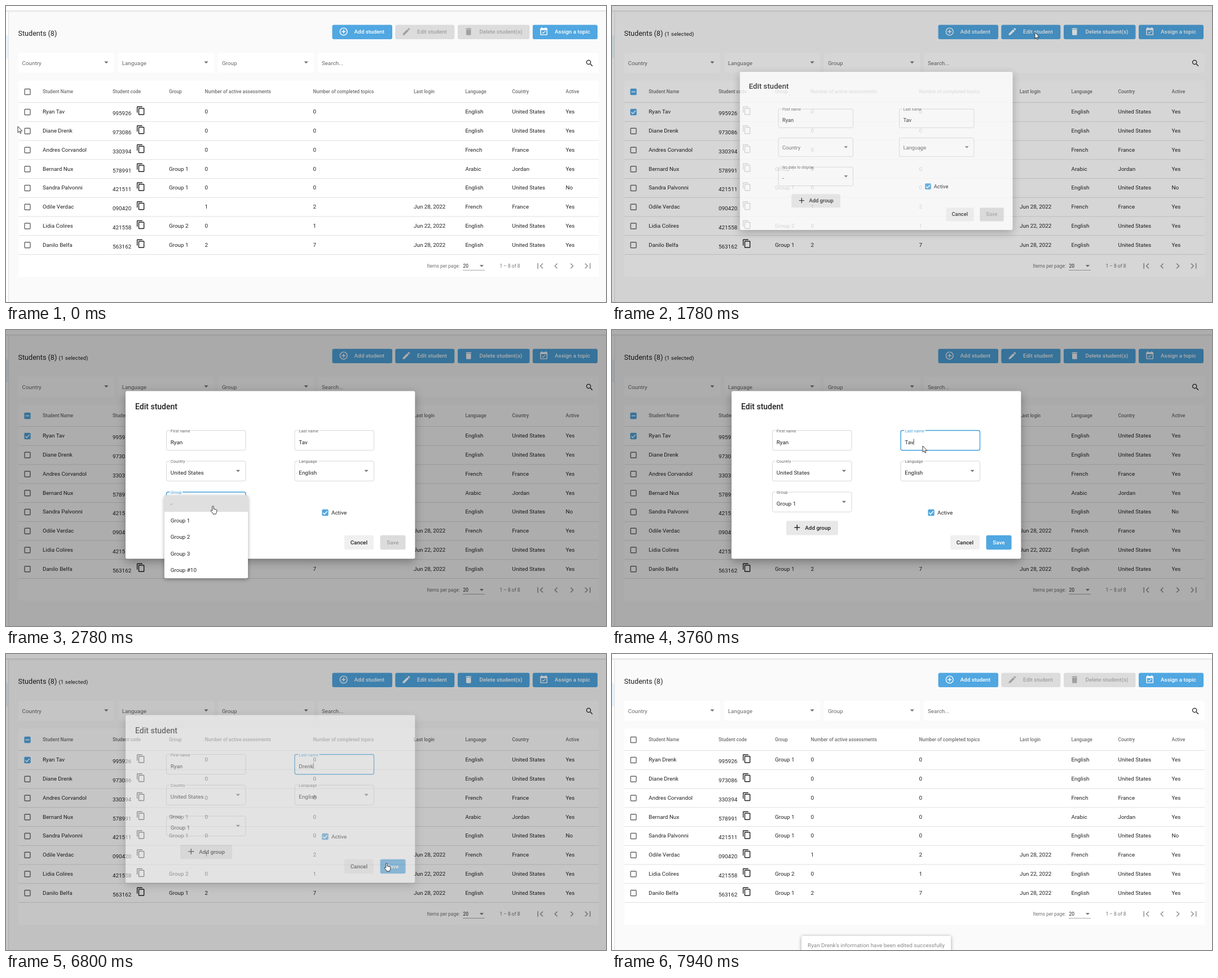
An HTML page that plays this animation: 1064 px wide and 526 px high, repeating every 8 s.

```html
<!DOCTYPE html>
<html lang="en">
<head>
<meta charset="utf-8">
<title>Students</title>
<style>
html, body { margin: 0; width: 100%; height: 100%; overflow: hidden; background: #fafafa; }
svg { display: block; width: 100vw; height: 100vh; font: 9.87px Roboto, sans-serif; }
text { fill: rgba(0,0,0,.87); white-space: pre; }
.title { font-size: 12.6px; }
.head { font-size: 8.46px; font-weight: 500; fill: rgba(0,0,0,.56); }
.small { font-size: 8.46px; fill: rgba(0,0,0,.56); }
.dark { font-size: 8.46px; }
.muted { fill: rgba(0,0,0,.6); }
.strong { font-weight: 500; }
.heading { font-size: 14px; font-weight: 500; }
.white { fill: #fff; }
.label { font-size: 7.4px; fill: rgba(0,0,0,.6); stroke: #fff; stroke-width: 4; paint-order: stroke; }
.card { fill: #fff; }
.line { stroke: rgba(0,0,0,.13); stroke-width: 1; }
.button rect { fill: #50a7e1; }
.button text, .button path { fill: #fff; }
.button.off rect { fill: #dcdcdc; }
.button.off text, .button.off path { fill: rgba(0,0,0,.27); }
.button.plain rect { fill: #e8e8e8; }
.button.pale rect { fill: #f0f0f0; }
.button.plain text, .button.plain path, .button.pale text { fill: rgba(0,0,0,.87); }
.box rect { fill: none; stroke: rgba(0,0,0,.6); stroke-width: 1.4; }
.box path { fill: none; stroke: #fff; stroke-width: 1.5; visibility: hidden; }
.box.on rect { fill: #50a7e1; stroke: #50a7e1; }
.box.on path { visibility: visible; }
.field rect { fill: none; stroke: rgba(0,0,0,.2); stroke-width: .8; }
.field.focus rect { stroke: #429fdb; stroke-width: 1.4; }
.field.focus .label { fill: #429fdb; }
.arrow { fill: rgba(0,0,0,.56); }
.icon { fill: rgba(0,0,0,.87); }
.pager { fill: rgba(0,0,0,.4); }
#modal > .sheet { fill: #fff; filter: drop-shadow(0 5px 8px rgba(0,0,0,.3)); }
#panel > .sheet { fill: #fff; filter: drop-shadow(0 2px 3px rgba(0,0,0,.35)); }
#toast rect { fill: #fff; filter: drop-shadow(0 1px 3px rgba(0,0,0,.35)); }
#toast text { fill: rgba(0,0,0,.47); text-anchor: middle; }
#cursor path { fill: #fff; stroke: #222; stroke-width: .9; stroke-linejoin: round; }
</style>
</head>
<body>
<svg id="stage" viewBox="0 0 1064 526" preserveAspectRatio="none"></svg>
<script>
const LOOP = 8000;
const FIRST = 'Ryan', OLD_LAST = 'Tav', NEW_LAST = 'Drenk';

const icons = {
  add: 'M13 7h-2v4H7v2h4v4h2v-4h4v-2h-4V7zm-1-5C6.48 2 2 6.48 2 12s4.48 10 10 10 10-4.48 10-10S17.52 2 12 2zm0 18c-4.41 0-8-3.59-8-8s3.59-8 8-8 8 3.59 8 8-3.59 8-8 8z',
  edit: 'M3 17.25V21h3.75L17.81 9.94l-3.75-3.75L3 17.25zM20.71 7.04c.39-.39.39-1.02 0-1.41l-2.34-2.34c-.39-.39-1.02-.39-1.41 0l-1.83 1.83 3.75 3.75 1.83-1.83z',
  bin: 'M6 19c0 1.1.9 2 2 2h8c1.1 0 2-.9 2-2V7H6v12zM19 4h-3.5l-1-1h-5l-1 1H5v2h14V4z',
  event: 'M16.53 11.06L15.47 10l-4.88 4.88-2.12-2.12-1.06 1.06L10.59 17l5.94-5.94zM19 3h-1V1h-2v2H8V1H6v2H5c-1.11 0-2 .9-2 2v14c0 1.1.89 2 2 2h14c1.1 0 2-.9 2-2V5c0-1.1-.9-2-2-2zm0 16H5V8h14v11z',
  plus: 'M19 13h-6v6h-2v-6H5v-2h6V5h2v6h6z',
  search: 'M15.5 14h-.79l-.28-.27A6.5 6.5 0 1 0 13.73 14.43l.27.28v.79l5 5L20.5 19zm-6 0a4.5 4.5 0 1 1 0-9 4.5 4.5 0 0 1 0 9z',
  copy: 'M16 1H4c-1.1 0-2 .9-2 2v14h2V3h12V1zm3 4H8c-1.1 0-2 .9-2 2v14c0 1.1.9 2 2 2h11c1.1 0 2-.9 2-2V7c0-1.1-.9-2-2-2zm0 16H8V7h11v14z',
  first: 'M18.41 16.59L13.82 12l4.59-4.59L17 6l-6 6 6 6zM6 6h2v12H6z',
  prev: 'M15.41 7.41L14 6l-6 6 6 6 1.41-1.41L10.83 12z',
  next: 'M10 6L8.59 7.41 13.17 12l-4.58 4.59L10 18l6-6z',
  last: 'M5.59 7.41L10.18 12l-4.59 4.59L7 18l6-6-6-6zM16 6h2v12h-2z'
};

const text = (x, y, s, cls = '', id = '') => `<text x="${x}" y="${y}" class="${cls}" id="${id}">${s}</text>`;
const rect = (x, y, w, h, cls = '', r = 3) => `<rect x="${x}" y="${y}" width="${w}" height="${h}" rx="${r}" class="${cls}"/>`;
const line = (x1, x2, y) => `<path class="line" d="M${x1} ${y}H${x2}"/>`;
const icon = (name, cx, cy, cls = 'icon', k = .705) =>
  `<path class="${cls}" d="${icons[name]}" transform="translate(${cx} ${cy}) scale(${k}) translate(-12 -12)"/>`;
const arrow = (cx, cy) => `<path class="arrow" d="M${cx - 3.6} ${cy - 1.8}h7.2l-3.6 3.6z"/>`;
const button = (id, cls, x, y, w, label, labelX, glyph = '', glyphX = 0) =>
  `<g id="${id}" class="button ${cls}">${rect(x, y, w, 25.5)}${glyph && icon(glyph, glyphX, y + 12)}${text(labelX, y + 15.8, label, 'strong')}</g>`;
const checkbox = (id, cx, cy, mark = 'M-3.7 .2l2.5 2.6 4.9-5.4', on = '') =>
  `<g id="${id}" class="box ${on}" transform="translate(${cx} ${cy})">${rect(-4.95, -4.95, 9.9, 9.9, '', 1)}<path d="${mark}"/></g>`;
const field = (id, x, y, label, value, select) =>
  `<g id="${id}" class="field">${rect(x, y, 140.5, 35.3)}${text(x + 7.3, y + 3.2, label, 'label')}` +
  `${text(x + 7.3, y + 24, value, 'value')}${select ? arrow(x + 127, y + 17.5) : ''}</g>`;

const columns = [65, 189, 289, 352.5, 544.5, 723, 814.5, 897.5, 992.5];
const headings = ['Student Name', 'Student code', 'Group', 'Number of active assessments',
  'Number of completed topics', 'Last login', 'Language', 'Country', 'Active'];
const rows = `${FIRST} ${OLD_LAST}|995926||0|0||English|United States|Yes
Diane Drenk|973086||0|0||English|United States|Yes
Andres Corvandol|330394||0|0||French|France|Yes
Bernard Nux|578991|Group 1|0|0||Arabic|Jordan|Yes
Sandra Palvonni|421511|Group 1|0|0||English|United States|No
Odile Verdac|090420||1|2|Jun 28, 2022|French|France|Yes
Lidia Colires|421558|Group 2|0|1|Jun 22, 2022|English|United States|Yes
Danilo Belfa|563162|Group 1|2|7|Jun 28, 2022|English|United States|Yes`
  .split('\n').map(row => row.split('|'));

function tableRow(cells, i) {
  const y = 191.3 + 33.75 * i;
  return cells.map((cell, c) => text(columns[c], c === 1 ? y + 3 : y, cell, '', `cell${i}-${c}`)).join('') +
    checkbox('check' + i, 38, y - 2.8) + icon('copy', 239, y - 5.3) + line(22, 1051, y + 14);
}

const page = `<rect width="1064" height="526" fill="#fafafa"/>
  ${rect(0, 10, 4, 516, 'card', 0)}<rect y="52" width="4" height="41" fill="#e9f4fc"/>
  <path d="M4.5 10V526" stroke="#dfdfdf"/>
  <rect y="8" width="1064" height="1.2" fill="#dcdcdc"/><rect y="9.2" width="1064" height="1.5" fill="#f0f0f0"/>
  ${rect(0, 0, 1064, 8, 'card', 0)}
  ${text(21.5, 53.4, 'Students (8)', 'title')}${text(93.5, 53, '(1 selected)', '', 'selected')}
  ${button('addStudent', '', 578.5, 33.5, 106.5, 'Add student', 617.5, 'add', 598.7)}
  ${button('editStudent', 'off', 690.3, 33.5, 105, 'Edit student', 729, 'edit', 710)}
  ${button('deleteStudent', 'off', 801, 33.5, 127.5, 'Delete student(s)', 839.5, 'bin', 820.3)}
  ${button('assign', '', 934, 33.5, 115, 'Assign a topic', 973, 'event', 953.7)}
  ${['Country', 'Language', 'Group'].map((name, i) => rect(21.7 + 177.2 * i, 83, 170, 35.5, 'card') +
    text(28.5 + 177.2 * i, 104.5, name, 'muted') + arrow(177.8 + 177.2 * i, 100.4)).join('')}
  ${rect(553, 83, 498, 35.5, 'card')}${text(560, 104.5, 'Search...', 'muted')}${icon('search', 1034.8, 101.6, 'icon', .66)}
  ${rect(21.7, 132.5, 1029.5, 349, 'card')}
  ${headings.map((h, i) => text(columns[i], 155, h, 'head')).join('')}
  ${checkbox('checkAll', 38, 152.5, 'M-3.5 0H3.5')}${line(22, 1051, 171.5)}
  ${rows.map(tableRow).join('')}
  <circle id="ripple" cx="38" cy="188.5" fill="#50a7e1"/>
  ${text(746.5, 465, 'Items per page:', 'small')}${text(810.5, 465, '20', 'dark')}
  ${arrow(843.5, 462)}<path d="M810 469.5h39" stroke="rgba(0,0,0,.42)" stroke-width=".8"/>
  ${text(875.5, 464.5, '1 – 8 of 8', 'small')}
  ${['first', 'prev', 'next', 'last'].map((name, i) => icon(name, 947.3 + 28.1 * i, 462, 'pager', .82)).join('')}`;

const modal = `<g id="modal">${rect(212, 108.5, 513.3, 298, 'sheet')}
  ${text(229, 140.5, 'Edit student', 'heading')}
  ${field('firstName', 284.5, 178.5, 'First name', FIRST)}
  ${field('lastName', 512, 178.5, 'Last name', OLD_LAST)}
  ${field('country', 284.5, 233, 'Country', '', true)}
  ${field('language', 512, 233, 'Language', '', true)}
  ${field('group', 284.5, 288, 'Group', '-', true)}
  <path id="caret" d="M0 193.5V204" stroke="#222" stroke-width=".8"/>
  ${checkbox('active', 566, 324.5, undefined, 'on')}${text(577, 328, 'Active')}
  ${button('addGroup', 'plain', 309, 339, 92, 'Add group', 342.3, 'plus', 328.3)}
  ${button('cancel', 'pale', 600, 364.7, 52, 'Cancel', 610.7)}
  ${button('save', 'off', 663.5, 364.7, 45, 'Save', 675.2)}</g>`;

const panel = `<g id="panel">${rect(280.8, 293.7, 148.3, 147.5, 'sheet')}
  <rect x="280.8" y="293.7" width="148.3" height="29.5" fill="#dfdfdf"/>
  <rect id="hover" x="280.8" y="323.2" width="148.3" height="29.6" fill="#f3f3f3"/>
  ${['-', 'Group 1', 'Group 2', 'Group 3', 'Group #10'].map((s, i) =>
    text(291.8, 312 + 29.55 * i, s, i ? '' : 'muted')).join('')}</g>`;

const $ = id => document.getElementById(id);
$('stage').innerHTML = page + '<rect id="shade" width="1064" height="526"/>' + modal + panel +
  `<g id="toast">${rect(336, 501, 265, 34)}${text(468.5, 521, `${FIRST} ${NEW_LAST}'s information have been edited successfully`)}</g>
  <g id="cursor"><path id="pointer" d="M0 0V11l2.5-2.3 1.7 3.8 1.7-.8-1.7-3.6h3.5z"/>
  <path id="hand" d="M-1.2 1a1.2 1.2 0 0 1 2.4 0v4l4.6 1.2q1.4.5 1.2 2l-.7 3.1q-.2 1-.9 1.8v1H.2v-1L-3.4 9q-.7-1.4.5-1.9 1-.3 1.7.9z"/></g>`;

function bezier(x1, y1, x2, y2) {
  const at = (a, b, s) => 3 * (1 - s) ** 2 * s * a + 3 * (1 - s) * s * s * b + s ** 3;
  return p => {
    let lo = 0, hi = 1;
    for (let i = 0; i < 20; i++) {
      const mid = (lo + hi) / 2;
      if (at(x1, x2, mid) < p) lo = mid; else hi = mid;
    }
    return at(y1, y2, hi);
  };
}
const decelerate = bezier(0, 0, .2, 1), swift = bezier(.25, .8, .25, 1), glide = bezier(.4, 0, .4, 1);
const linear = p => p;
const progress = (t, start, span, ease = linear) => ease(Math.min(1, Math.max(0, (t - start) / span)));
const within = (t, a, b) => t >= a && t < b;
const show = (id, visible) => $(id).style.display = visible ? '' : 'none';
const scaleAt = (cx, cy, kx, ky = kx) => `translate(${cx} ${cy}) scale(${kx} ${ky}) translate(${-cx} ${-cy})`;

// time, x, y
const path = [[320, 21, 214], [640, 37, 187], [900, 37, 187], [1500, 750, 47], [2000, 750, 47], [2200, 602, 180],
  [2450, 367, 313], [2790, 367, 313], [3000, 345, 338], [3150, 345, 338], [3570, 551, 206], [3780, 551, 206],
  [4080, 557, 212], [6150, 557, 212], [6560, 675, 372]];
const hands = [[560, 950], [1440, 1720], [2350, 3240], [6500, 7000]];
const typing = [[4750, 0], [5020, 1], [5290, 2], [5420, 3], [5620, 4], [5690, 5]];

function cursorAt(t) {
  const i = path.findIndex(p => p[0] > t);
  if (i === 0) return path[0].slice(1);
  if (i < 0) return path[path.length - 1].slice(1);
  const [t0, x0, y0] = path[i - 1], [t1, x1, y1] = path[i];
  const k = progress(t, t0, t1 - t0, glide);
  return [x0 + (x1 - x0) * k, y0 + (y1 - y0) * k];
}

function setField(id, label, value, placeholder = false) {
  const [labelText, valueText] = $(id).querySelectorAll('text');
  labelText.textContent = placeholder ? '' : label;
  valueText.textContent = placeholder ? label : value;
  valueText.classList.toggle('muted', placeholder);
  const top = +$(id).querySelector('rect').getAttribute('y');
  valueText.setAttribute('y', top + (placeholder ? 22 : 24));
}

function renderTable(t) {
  const picked = within(t, 700, 7060), saved = t >= 7060;
  show('selected', picked);
  for (const id of ['editStudent', 'deleteStudent']) $(id).classList.toggle('off', !picked);
  for (const id of ['checkAll', 'check0']) $(id).classList.toggle('on', picked);
  $('cell0-0').textContent = `${FIRST} ${saved ? NEW_LAST : OLD_LAST}`;
  $('cell0-2').textContent = saved ? 'Group 1' : '';
  $('ripple').setAttribute('r', 14 * progress(t, 680, 200, decelerate));
  $('ripple').setAttribute('opacity', .18 * (1 - progress(t, 850, 250)));
}

function renderModal(t) {
  const enter = progress(t, 1712, 150, decelerate), leave = progress(t, 6765, 75);
  show('modal', enter > 0 && leave < 1);
  $('modal').setAttribute('opacity', enter * (1 - leave));
  $('modal').setAttribute('transform', scaleAt(468.6, 257.5, .7 + .3 * enter));
  $('shade').setAttribute('opacity', .32 * (progress(t, 1718, 400, swift) - progress(t, 6765, 400, swift)));

  const loaded = t >= 1850, grouped = t >= 3080;
  setField('country', 'Country', 'United States', !loaded);
  setField('language', 'Language', 'English', !loaded);
  setField('group', loaded ? 'Group' : 'No data to display', grouped ? 'Group 1' : '-');
  $('save').classList.toggle('off', !grouped);
  $('group').classList.toggle('focus', within(t, 2450, 3690));
  $('lastName').classList.toggle('focus', t >= 3690);

  const typed = typing.filter(step => t >= step[0]).pop();
  setField('lastName', 'Last name', typed ? NEW_LAST.slice(0, typed[1]) : OLD_LAST);
  show('caret', t >= 3690 && !within(t, 4090, 4420));
  const width = $('lastName').querySelector('.value').getComputedTextLength();
  $('caret').setAttribute('transform', `translate(${519.7 + width} 0)`);

  const open = progress(t, 2450, 120, decelerate), close = progress(t, 3080, 100);
  show('panel', open > 0 && close < 1);
  $('panel').setAttribute('opacity', open * (1 - close));
  $('panel').setAttribute('transform', scaleAt(355, 294, 1, .8 + .2 * open));
  show('hover', t >= 2900);
}

function renderToast(t) {
  const k = progress(t, 6855, 150, decelerate);
  $('toast').setAttribute('opacity', k);
  $('toast').setAttribute('transform', scaleAt(468.5, 518, .8 + .2 * k));
}

function renderCursor(t) {
  const hand = hands.some(([a, b]) => within(t, a, b));
  show('cursor', t < 7340);
  show('hand', hand);
  show('pointer', !hand);
  $('cursor').setAttribute('transform', `translate(${cursorAt(t)})`);
}

function frame(now) {
  const t = now % LOOP;
  renderTable(t);
  renderModal(t);
  renderToast(t);
  renderCursor(t);
  requestAnimationFrame(frame);
}
frame(performance.now());
</script>
</body>
</html>
```
